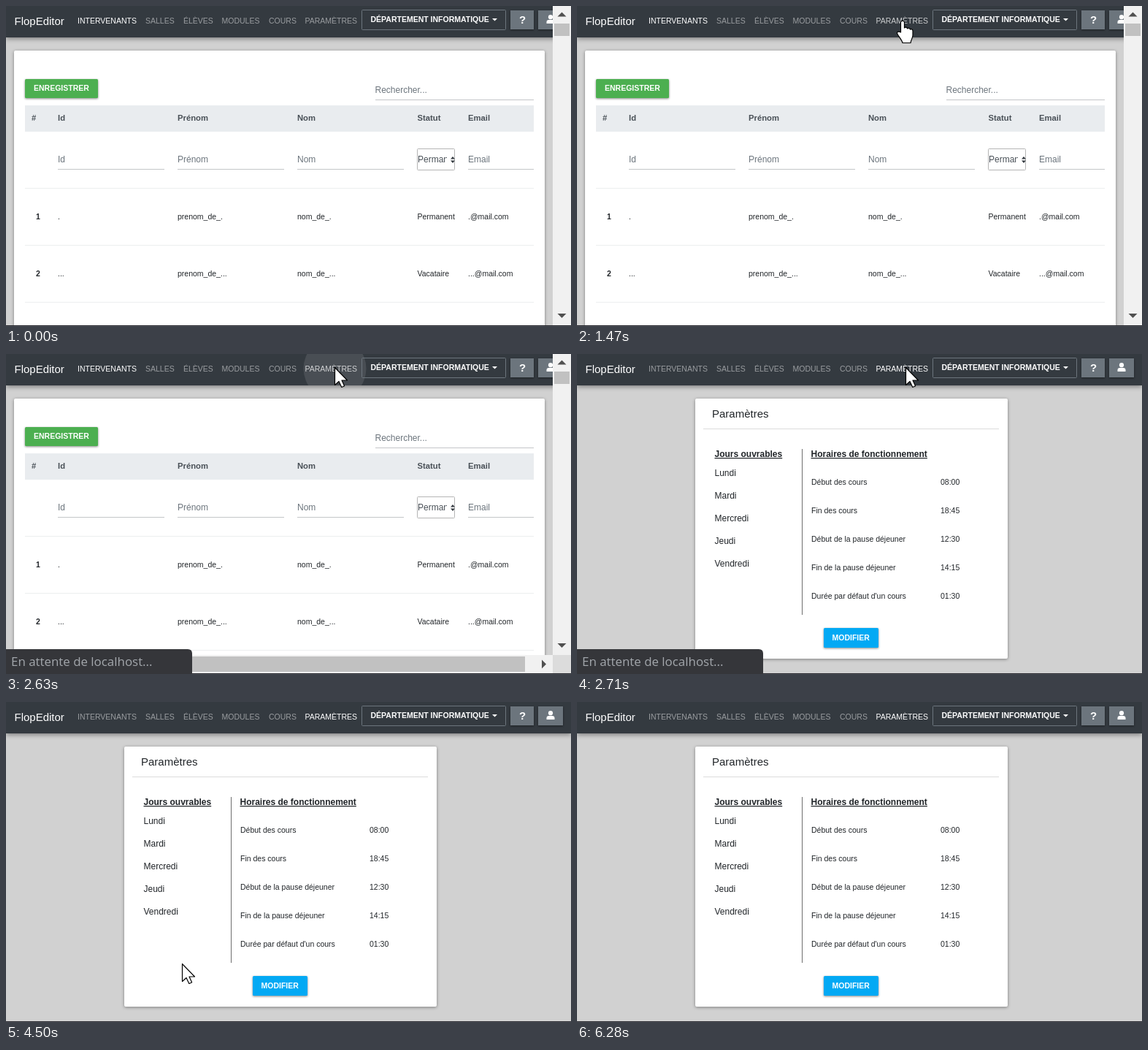
An HTML page for the animation above (6.38 s loop, 774 by 438 pixels).

```html
<!DOCTYPE html>
<html lang="fr">
<meta charset="utf-8">
<title>FlopEditor</title>
<style>
  html, body { margin: 0; width: 100%; height: 100%; overflow: hidden; background: #d1d1d1; }
  svg { display: block; font: 10.5px "Liberation Sans", Arial, sans-serif; fill: #212529; }
  .card { fill: #fff; filter: drop-shadow(0 1px 2px #0006); }
  .btn { filter: drop-shadow(0 1px 1.5px #0007); }
  .b { font-weight: bold; }
  .w { fill: #fff; }
  .mid { font-size: 12px; }
  .hint { font-size: 12px; fill: #6c757d; }
  .head { font: bold 11.25px "Liberation Sans", Arial, sans-serif; fill: #495057; }
  .big { font-size: 15px; }
  .u { text-decoration: underline; }
  .track { fill: #f1f1f1; }
  .thumb { fill: #c1c1c1; }
  .arrow { fill: #505050; }
  #statusText { font: 16.9px "Open Sans", "Noto Sans", sans-serif; fill: #a3a7ac; }
  #cursor path { fill: #fff; stroke: #000; stroke-width: 1.2; stroke-linejoin: round; }
</style>
<svg width="774" height="438" viewBox="0 0 774 438">
  <defs><clipPath id="navClip"><path d="M0 0H774V43H0Z"/></clipPath>
    <clipPath id="selectClip"><path d="M563 195H604V224H563Z"/></clipPath>
    <clipPath id="tableClip"><path d="M26 60H723V438H26Z"/></clipPath></defs>
  <rect width="774" height="438" fill="#d1d1d1"/>

  <g id="people">
    <rect class="card" x="11" y="61" width="727" height="400" rx="2"/>
    <rect class="btn" x="26" y="100" width="100" height="26" rx="1.5" fill="#4caf50"/>
    <text class="b w" x="38" y="116">ENREGISTRER</text>
    <text class="hint" x="505.500" y="119">Rechercher...</text>
    <rect x="26" y="136" width="697" height="36" fill="#e9ecef"/>
    <path d="M506 128.500H723M71 223.500H217M235 223.500H381M399 223.500H545M633 223.500H723" stroke="#c4c6c8"/>
    <path d="M26 249.500H723M26 327.500H723M26 405.500H723" stroke="#eceeef"/>
    <rect x="563.500" y="195.500" width="51" height="29" rx="1" fill="#fff" stroke="#b5b5b5"/>
    <text class="mid" x="564" y="214" fill="#495057" clip-path="url(#selectClip)">Permanent</text>
    <path d="M609 209.500L612 206 615 209.500ZM609 211.500L612 215 615 211.500Z" fill="#343a40"/>
    <g id="table" clip-path="url(#tableClip)"></g>
  </g>

  <g id="settings">
    <rect class="card" x="162" y="61" width="428" height="356" rx="2"/>
    <text class="big" x="185" y="87">Paramètres</text>
    <path d="M173 102.500H578" stroke="#dcdcdc"/>
    <path d="M308.500 130V357" stroke="#6f6f6f"/>
    <text class="mid b u" x="188.500" y="141">Jours ouvrables</text>
    <text class="mid b u" x="320.500" y="141">Horaires de fonctionnement</text>
    <g id="lists"></g>
    <rect class="btn" x="338" y="375" width="75" height="27" rx="1.5" fill="#03a9f4"/>
    <text class="b w" x="349.500" y="392">MODIFIER</text>
  </g>

  <g>
    <rect width="774" height="43" fill="#343a40" style="filter:drop-shadow(0 2px 3px #0006)"/>
    <circle id="ripple" cx="450.500" cy="20" fill="#fff" fill-opacity=".1" clip-path="url(#navClip)"/>
    <text class="big w" x="11.500" y="26">FlopEditor</text>
    <g id="menu"></g>
    <rect x="487.500" y="5.500" width="197" height="27" rx="1" fill="none" stroke="#6c757d"/>
    <text class="b w" x="499.500" y="22">DÉPARTEMENT INFORMATIQUE</text>
    <path class="w" d="M666 17H673L669.500 20.500Z"/>
    <path class="btn" d="M691 6H723V32H691ZM729 6H763V32H729Z" fill="#6c757d"/>
    <text class="b w" x="703" y="23.500" style="font-size:15px">?</text>
    <circle class="w" cx="746" cy="15.200" r="3.100"/>
    <path class="w" d="M740.500 24V22Q740.500 19 743.500 19H748.500Q751.500 19 751.500 22V24Z"/>
  </g>

  <g id="vbar">
    <path class="track" d="M749 0H774V438H749Z"/>
    <path class="thumb" d="M751 24H772V41H751Z"/>
    <path class="arrow" d="M755.500 14.500H767.500L761.500 8.500Z"/>
    <path id="down" class="arrow" d="M755.500 421H767.500L761.500 427Z"/>
  </g>
  <g id="hbar">
    <path class="track" d="M0 412H774V438H0Z"/>
    <path class="thumb" d="M25 414H711V435H25Z"/>
    <path class="arrow" d="M734 418.500V430.500L740 424.500Z"/>
    <path d="M749 412H774V438H749Z" fill="#dcdcdc"/>
  </g>
  <path d="M0 437.500H774" stroke="#25262c"/>
  <g id="status">
    <path id="bubble" fill="#35363a"/>
    <text id="statusText" x="7" y="427"></text>
  </g>
  <g id="cursor">
    <path id="pointer" d="M.5 .5V24.500L6 19.500 9.800 27.500 13.600 25.800 10 18H17.500Z"/>
    <path id="hand" d="M-2.500 16V2.700a2.500 2.500 0 0 1 5 0V10c1-1.500 4-1 4 1 1-1.300 4-.8 4 1.200 1-1 3.500-.5 3.500 1.800V20c0 4-2.500 6-3 10.500H0C-1 26-7 20-7.500 17c0-2 2.500-2.500 5-1Z"/>
  </g>
</svg>
<script>
const LOOP = 6380;
const $ = id => document.getElementById(id);
const show = (id, on) => $(id).style.display = on ? '' : 'none';
const clamp = v => Math.min(1, Math.max(0, v));
const text = (str, x, y, cls = '') => `<text class="${cls}" x="${x}" y="${y}">${str}</text>`;

const columns = [35, 71, 235, 399, 563.5, 633];
const row = (cells, y, cls) => cells.map((c, i) => text(c, columns[i], y, i ? cls : cls + ' b')).join('');
const person = (n, id, status, y) =>
  text(n, 41, y, 'b') + row(['', id, 'prenom_de_' + id, 'nom_de_' + id, status, id + '@mail.com'], y, '');
$('table').innerHTML =
  row(['#', 'Id', 'Prénom', 'Nom', 'Statut', 'Email'], 157, 'head') +
  row(['', 'Id', 'Prénom', 'Nom', '', 'Email'], 214, 'hint') +
  person(1, '.', 'Permanent', 292) + person(2, '...', 'Vacataire', 370);

const days = ['Lundi', 'Mardi', 'Mercredi', 'Jeudi', 'Vendredi'];
const hours = [['Début des cours', '08:00'], ['Fin des cours', '18:45'], ['Début de la pause déjeuner', '12:30'],
  ['Fin de la pause déjeuner', '14:15'], ["Durée par défaut d'un cours", '01:30']];
$('lists').innerHTML =
  days.map((d, i) => text(d, 188.5, 167 + 31 * i, 'mid')).join('') +
  hours.map(([label, time], i) => text(label, 321, 179 + 39 * i) + text(time, 498, 179 + 39 * i)).join('');

const links = { INTERVENANTS: 98, SALLES: 191, 'ÉLÈVES': 243, MODULES: 295.5, COURS: 360, 'PARAMÈTRES': 409.5 };
$('menu').innerHTML = Object.entries(links).map(([name, x]) => text(name, x, 24, 'w')).join('');
const items = [...$('menu').children];

const smooth = p => p * p * (3 - 2 * p);
const easeOut = p => 1 - (1 - p) ** 2;
// Pointer moves: start, end, steps, easing, from, bend, to
const moves = [
  [220, 700, 7, smooth, [640, 445], [600, 150], [437, 36]],
  [1010, 1080, 2, smooth, [437, 36], [428, 27], [419, 18]],
  [1160, 1470, 5, smooth, [419, 18], [418, 20], [446, 20]],
  [1620, 1700, 2, smooth, [446, 20], [449, 20], [451, 19]],
  [2630, 2630, 1, smooth, [451, 19], [450, 18], [450, 18]],
  [3340, 3730, 6, easeOut, [450, 19], [344, 152], [272, 172]],
  [3880, 4500, 9, smooth, [272, 172], [645, 280], [241, 358]],
  [4880, 5120, 4, smooth, [241, 358], [400, 365], [560, 392]],
  [5350, 5670, 5, smooth, [560, 392], [600, 405], [618, 440]],
];

function pointerAt(t) {
  const move = moves.filter(m => t >= m[0]).pop();
  if (!move) return [0, 500];
  const [start, end, steps, ease, a, b, c] = move;
  const gap = (end - start) / (steps - 1) || 1;
  const step = Math.min(steps, Math.floor((t - start) / gap + .1) + 1);
  const u = ease(step / steps), v = 1 - u;
  return a.map((_, i) => v * v * a[i] + 2 * u * v * b[i] + u * u * c[i]);
}

// Value of the last [time, value] pair already reached
const held = (t, pairs) => pairs.filter(p => t >= p[0]).pop()[1];

function draw(t) {
  const loaded = t >= 2710;
  const overflow = t >= 2340 && !loaded;
  show('people', !loaded);
  show('settings', loaded);
  show('vbar', !loaded);
  show('hbar', overflow);
  $('down').setAttribute('transform', `translate(0 ${overflow ? -25 : 0})`);

  const hover = clamp((t - 1010) / 400);
  items.forEach((el, i) => {
    const active = i === (loaded ? 5 : 0);
    el.style.fillOpacity = active ? 1 : i === 5 ? .5 + .25 * hover : .5;
  });
  $('ripple').setAttribute('r', loaded ? 0 : held(t, [[0, 0], [2250, 14], [2340, 28], [2430, 38], [2630, 43]]));

  const width = t < 2780 ? 255 : 18;
  $('bubble').setAttribute('d', `M0 404H${width - 6}q6 0 6 6V438H0Z`);
  $('statusText').textContent =
    held(t, [[0, 'localhost/.../parameters'], [2250, 'En attente de localhost...'], [2780, '']]);
  $('status').style.opacity = held(t, [[0, 0], [1620, .5], [1700, 1], [3030, .66], [3110, .33], [3190, 0]]);

  const [x, y] = pointerAt(t);
  const onLink = t >= 1010 && t < 2630;
  show('cursor', t >= 220 && t < 5670);
  show('hand', onLink);
  show('pointer', !onLink);
  $('cursor').setAttribute('transform', `translate(${x.toFixed(1)} ${y.toFixed(1)})`);
}

function tick() {
  draw(performance.now() % LOOP);
  requestAnimationFrame(tick);
}
tick();
</script>
</html>
```
